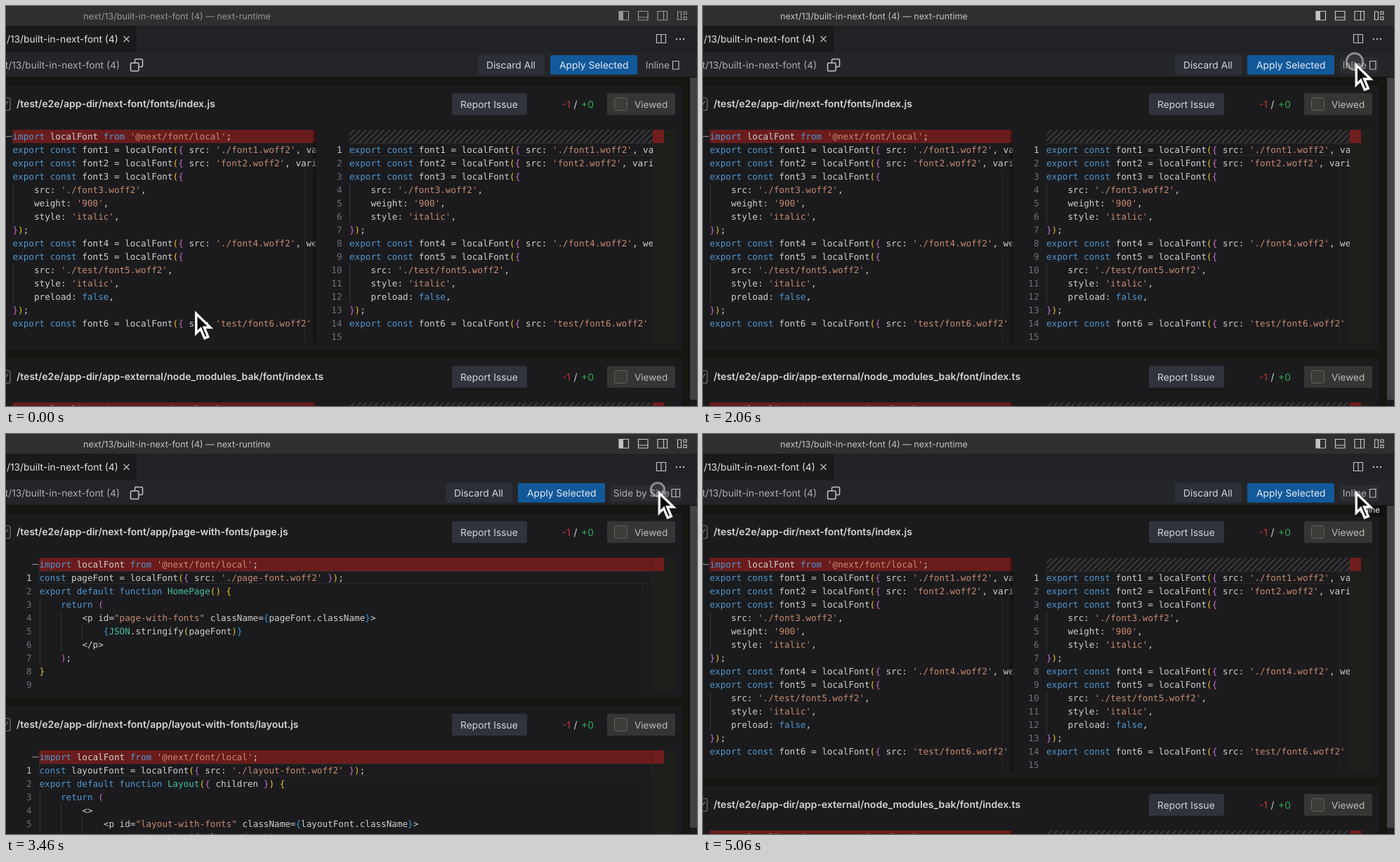
These frames come from a looping animation (984 by 569 pixels, 5.2 s). An HTML page:

```html
<!DOCTYPE html>
<html lang="en">
<head>
<meta charset="utf-8">
<title>Diff review</title>
<style>
  html, body { margin: 0; width: 100%; height: 100%; overflow: hidden; background: #161512; }
  #stage { display: block; width: 100vw; height: 100vh; }
  text { font: 13.8px Inter, "Open Sans", sans-serif; fill: #d6d6d8; text-rendering: geometricPrecision; }
  .code text { font: 12.64px "DejaVu Sans Mono", monospace; fill: #cfcfcf; }
  .code .num { fill: #6d7078; text-anchor: end; }
  .code .on { fill: #c8c8c8; }
  .key { fill: #4f96cf; }
  .str { fill: #c78a6f; }
  .type { fill: #45bda5; }
  .b0 { fill: #e9c72a; }
  .b1 { fill: #c76bc6; }
  .b2 { fill: #2f9be8; }
  text.path { font-size: 14px; font-weight: 600; }
  text.soft { fill: #adaeb0; }
  .line { fill: none; stroke: currentColor; stroke-width: 1.2; }
  .fill { fill: currentColor; }
  .off { display: none; }
</style>
</head>
<body>
<svg id="stage" viewBox="0 0 984 569" preserveAspectRatio="none"></svg>
<script>
const LOOP = 5200, STEP = 200 / 3;
const CHAR = 7.61, ROW = 19, TOP = 176;
const KEYWORDS = new Set('import export from const default function return false'.split(' '));
const TYPES = new Set(['JSON', 'HomePage', 'Layout']);
const REMOVED = "import localFont from '@next/font/local';";

const FILES = {
  fonts: {
    path: '/test/e2e/app-dir/next-font/fonts/index.js',
    code: `export const font1 = localFont({ src: './font1.woff2', variable: '--font-1' });
export const font2 = localFont({ src: 'font2.woff2', variable: '--font-2' });
export const font3 = localFont({
    src: './font3.woff2',
    weight: '900',
    style: 'italic',
});
export const font4 = localFont({ src: './font4.woff2', weight: '100' });
export const font5 = localFont({
    src: './test/font5.woff2',
    style: 'italic',
    preload: false,
});
export const font6 = localFont({ src: 'test/font6.woff2' });
`
  },
  external: {
    path: '/test/e2e/app-dir/app-external/node_modules_bak/font/index.ts',
    code: ''
  },
  page: {
    path: '/test/e2e/app-dir/next-font/app/page-with-fonts/page.js',
    code: `const pageFont = localFont({ src: './page-font.woff2' });
export default function HomePage() {
    return (
        <p id="page-with-fonts" className={pageFont.className}>
            {JSON.stringify(pageFont)}
        </p>
    );
}
`
  },
  layout: {
    path: '/test/e2e/app-dir/next-font/app/layout-with-fonts/layout.js',
    code: `const layoutFont = localFont({ src: './layout-font.woff2' });
export default function Layout({ children }) {
    return (
        <>
            <p id="layout-with-fonts" className={layoutFont.className}>
                {JSON.stringify(layoutFont)}
            </p>`
  }
};

const rect = (x, y, w, h, fill, r = 0) =>
  `<rect x="${x}" y="${y}" width="${w}" height="${h}" rx="${r}" fill="${fill}"/>`;
const text = (x, y, s, attrs = '') => `<text x="${x}" y="${y}" ${attrs}>${s}</text>`;
const path = (d, attrs = '') => `<path class="line" d="${d}" ${attrs}/>`;
const box = (x, y, w, h) => `M${x} ${y}h${w}v${h}h${-w}z`;

// Bracket depth carries over from line to line.
function highlighter() {
  let depth = 0;
  const kind = tok => {
    if (/^['"]/.test(tok)) return 'str';
    if (/^[({]$/.test(tok)) return 'b' + depth++ % 3;
    if (/^[)}]$/.test(tok)) return 'b' + --depth % 3;
    return KEYWORDS.has(tok) ? 'key' : TYPES.has(tok) ? 'type' : '';
  };
  return line => (line.match(/'[^']*'|"[^"]*"|\w+|[(){}]|[^\w'"(){}]+/g) || []).map(tok => {
    const cls = kind(tok), s = tok.replace(/</g, '&lt;');
    return cls ? `<tspan class="${cls}">${s}</tspan>` : s;
  }).join('');
}

function codeRows(file, x, numX) {
  const paint = highlighter();
  return file.code.split('\n').map((line, i) => {
    const y = TOP + ROW * (i + 1), indent = line.search(/\S|$/);
    let out = '';
    for (let col = 0; col < indent; col += 4) {
      out += rect(Math.round(x + col * CHAR), y, 1, ROW, '#37373a');
    }
    if (numX) out += text(numX, y + 13.7, i + 1, `class="num${i ? '' : ' on'}"`);
    return out + text(x + indent * CHAR, y + 13.7, paint(line.trim()));
  }).join('');
}

const removedRow = (x, end) =>
  rect(x, TOP, end - x, ROW, '#6a1c1c') +
  path(`M${x - 10} 185.5h9`, 'color="#8b8b8d"') +
  text(x, TOP + 13.7, highlighter()(REMOVED));

const activeRow = x =>
  path(box(x + .5, TOP + ROW + .5, 920 - x, ROW - 2), 'color="#29292b" stroke-width="1"');

// A nested svg clips the code to its pane.
const pane = (x, w, body) =>
  `<svg x="${x}" width="${w}" height="2000" viewBox="${x} 0 ${w} 2000">${body}</svg>`;

function diff(file, split) {
  const h = ROW * (file.code.split('\n').length + 1);
  const ruler = x => rect(x, TOP, 1, h, '#252527');
  const overview = rect(921, TOP, 32, h, '#1e1e1b') + rect(921, TOP, 16, ROW, '#701d1d');
  if (!split) {
    return overview + ruler(906) + activeRow(47) +
      pane(0, 921, removedRow(47.5, 921) + codeRows(file, 47.5, 36.5)) +
      rect(920.5, TOP, 1, ROW, '#5c1b1b');
  }
  return overview + ruler(425) + ruler(906) +
    pane(0, 441, removedRow(9.5, 441) + codeRows(file, 9.5)) +
    rect(436, TOP, 5, h, 'url(#shade)') +
    rect(489, TOP, 432, ROW, 'url(#hatch)') + activeRow(489) +
    pane(443, 478, codeRows(file, 489, 478.5));
}

function card(file, dy, split) {
  const h = ROW * (file.code.split('\n').length + 1) + 72;
  return `<g transform="translate(0 ${dy})">` +
    rect(0, 113, 963, Math.max(h, 200), '#1b1b1d') +
    path('M-3 130.5h6a3 3 0 0 1 3 3v12a3 3 0 0 1-3 3h-6M-2 143L3 135', 'color="#77777a"') +
    text(15, 144.4, file.path, 'class="path"') +
    rect(635, 124, 107, 31, '#30333b', 2) + text(647, 144.6, 'Report Issue') +
    text(792, 144.5, '-1', 'style="fill:#c93535"') + text(808.5, 144.5, '/') +
    text(819, 144.5, '+0', 'style="fill:#35a853"') +
    rect(856, 124, 97, 31, '#353633', 2) +
    `<rect x="866.5" y="130.5" width="18" height="18" rx="3" fill="#3b3b37" stroke="#62625e"/>` +
    text(895, 144.5, 'Viewed', 'style="font-size:13.5px;fill:#bcbcbb"') +
    `<g class="code">${diff(file, split)}</g></g>`;
}

const view = (id, a, b, gap, split) =>
  `<g id="${id}">${card(FILES[a], 0, split)}${card(FILES[b], gap, split)}</g>`;

const actions = (id, label, dx, icon) => `<g id="${id}">` +
  rect(672 + dx, 70, 95, 27.5, '#2c2f36', 2) + text(684 + dx, 89.3, 'Discard All') +
  rect(775 + dx, 70, 124, 27.5, '#12599a', 2) +
  text(788 + dx, 89.3, 'Apply Selected', 'style="fill:#e4ebf2"') +
  `<rect class="hover" x="${907 + dx}" y="73" width="${55 - dx}" height="23" rx="4" fill="#2c2d30"/>` +
  text(910.8 + dx, 89.3, label, 'class="soft" style="font-size:13.6px"') +
  path(icon, 'color="#bcbdbe"') + '</g>';

const titleBar = rect(0, 0, 984, 28, '#2f302d') +
  '<g id="titleBar">' +
  text(110, 18.6, 'next/13/built-in-next-font (4) — next-runtime',
    'style="font-size:12.6px;fill:currentColor"') +
  [873, 900.5, 928].map(x => path(box(x, 7.5, 13.5, 12.5))).join('') +
  '<path class="fill" d="M873 7.5h6v12.5h-6z"/>' +
  path('M900.5 16h13.5M936.5 7.5v12.5') +
  path(box(956.5, 8, 5, 11.5) + box(965, 8, 4, 4) + box(965, 15.5, 4, 4)) + '</g>';

const tabs = rect(0, 28, 984, 38, '#212225') + rect(0, 28, 186, 38, '#1a1a1c') +
  text(1, 52.2, '/13/built-in-next-font (4)', 'style="fill:#e2e2e3"') +
  '<g color="#bfc0c1">' + path('M167.5 43l8 8m0-8l-8 8') +
  path(box(926.5, 40.5, 13, 12) + 'M933 40.5v12') +
  [955, 960, 965].map(x => `<circle class="fill" cx="${x}" cy="47" r="1.2"/>`).join('') + '</g>';

const toolbar = rect(0, 66, 984, 35, '#242528') + rect(0, 101, 984, 1, '#101010') +
  text(162, 89, 'next/13/built-in-next-font (4)', 'class="soft" text-anchor="end"') +
  '<g color="#c4c5c6">' +
  path('M183.5 80.5v-3.5q0-1.5 1.5-1.5h8q1.5 0 1.5 1.5v8q0 1.5-1.5 1.5h-3.5',
    'style="stroke-width:1.5"') +
  '<rect class="line" x="177.5" y="81" width="11.5" height="11.5" rx="1.5" style="stroke-width:1.5"/></g>';

const stage = document.getElementById('stage');
stage.innerHTML = `<defs>
    <pattern id="hatch" width="8" height="8" patternUnits="userSpaceOnUse"
      patternTransform="translate(489 176) scale(1.053)">
      <path d="M-2 1L1 -2M-1 8L8 -1M6 9L9 6" stroke="#464647" stroke-width="1.4"/>
    </pattern>
    <linearGradient id="shade">
      <stop stop-opacity="0"/><stop offset="1" stop-opacity=".55"/>
    </linearGradient>
  </defs>` +
  rect(0, 0, 984, 569, '#161512') +
  view('fontsSplit', 'fonts', 'external', 388, true) +
  view('fontsInline', 'fonts', 'external', 388, false) +
  view('pageSplit', 'page', 'layout', 274, true) +
  view('pageInline', 'page', 'layout', 274, false) +
  rect(974, 66, 10, 503, '#1c1c1c') + rect(974, 66, 10, 494, '#414244') +
  titleBar + tabs + toolbar +
  actions('inlineBar', 'Inline', 0, box(949.5, 78.5, 8.5, 11.5)) +
  actions('sideBar', 'Side by Side', -46, box(948, 78.5, 11.5, 11) + 'M953.75 78.5v11') +
  `<g id="tip">${rect(929, 102, 43, 16, '#101011', 3)}` +
  text(935, 112, 'Inline', 'style="font-size:11.5px;fill:#e2e2e2"') + `</g>
  <circle id="ring" cx="928" cy="79" fill="#888" fill-opacity=".12"
    stroke="#b8b8b8" stroke-opacity=".68" stroke-width="3"/>
  <path id="cursor" d="M1.8 4.6V32.5L8.2 26.3L13.8 39.6L18.8 37.5L13.2 24.3H22Z"
    fill="#0c0c0c" stroke="#fff" stroke-width="3.4" stroke-miterlimit="6"/>`;

const $ = id => document.getElementById(id);
const show = (el, on) => el.classList.toggle('off', !on);
const clamp = v => Math.min(1, Math.max(0, v));
const VIEWS = ['fontsSplit', 'fontsInline', 'pageSplit', 'pageInline'];
const CLICKS = [27 * STEP, 49 * STEP];
const hovers = stage.querySelectorAll('.hover');

function viewAt(t) {
  if (t < 2200 || t >= 3660) return 'fontsSplit';
  if (t < 2260) return 'pageSplit';
  return t < 3600 ? 'pageInline' : 'fontsInline';
}

function draw(t) {
  const q = Math.floor((t + 7) / STEP) * STEP;
  const now = viewAt(t), side = now.startsWith('page');

  VIEWS.forEach(id => show($(id), id === now));
  show($('inlineBar'), !side);
  show($('sideBar'), side);
  hovers.forEach(el => show(el, t >= 1460));
  show($('tip'), t >= 5060);
  $('titleBar').setAttribute('color', t < 130 ? '#989896' : '#c4c4c2');

  const k = (1 - Math.cos(Math.PI * clamp((q - 995) / 571))) / 2;
  $('cursor').setAttribute('transform', `translate(${269 + 659.5 * k} ${433 - 353.5 * k})`);

  const age = q - (q < 3000 ? CLICKS[0] : CLICKS[1]);
  const live = age > -1 && age < 730;
  show($('ring'), live);
  if (live) {
    $('ring').setAttribute('r', 3.5 + .0306 * age);
    $('ring').setAttribute('opacity', Math.min(clamp((age + 70) / 200), clamp((733 - age) / 330)));
  }
}

const start = performance.now();
function tick() {
  draw((performance.now() - start) % LOOP);
  requestAnimationFrame(tick);
}
tick();
</script>
</body>
</html>
```
